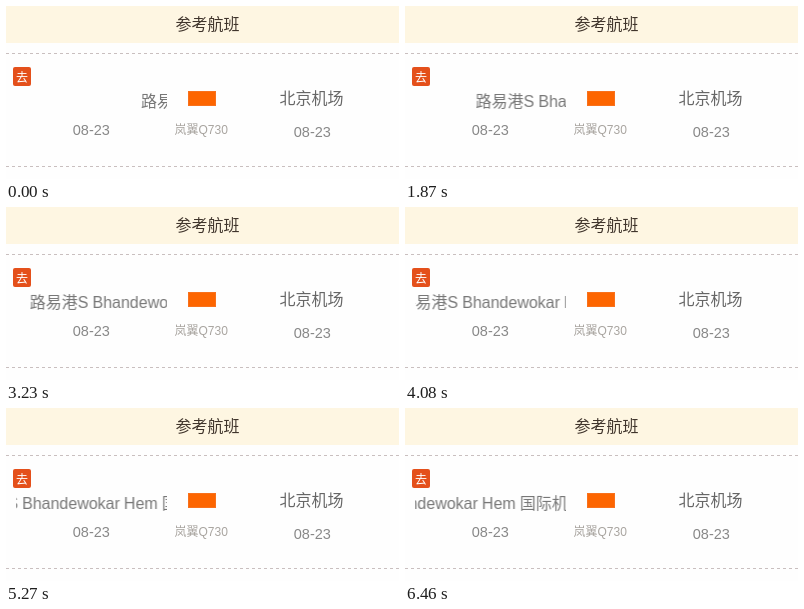
These frames come from a looping animation (393 by 173 pixels, 6630 ms). An HTML page:

```html
<!DOCTYPE html>
<html lang="zh-CN">
<head>
<meta charset="utf-8">
<title>参考航班</title>
<style>
  html, body { margin: 0; width: 100%; height: 100%; overflow: hidden; background: #fefefe; }
  svg { display: block; width: 393px; height: 173px; }
  text {
    font: 16px "Liberation Sans", "Noto Sans CJK SC", "Noto Sans CJK", sans-serif;
    fill: #777;
    white-space: pre;
  }
  .title { fill: #40352c; }
  .place { fill: #666; }
  .date { font-size: 14.5px; fill: #888; }
  .model { font-size: 12px; fill: #a9a5a0; }
  .tag { font-size: 12px; fill: #fff; }
  .rule { stroke: #c9bfbf; stroke-dasharray: 3 3; }
  .scroll { word-spacing: -.4px; animation: scroll 6630ms steps(39) infinite; }
  @keyframes scroll { to { transform: translateX(-228.5px); } }
</style>
</head>
<body>
<svg viewBox="0 0 393 173">
  <clipPath id="window"><rect x="10" y="82" width="151" height="28"/></clipPath>

  <rect width="393" height="37" fill="#fef6e2"/>
  <text class="title" x="169.5" y="24">参考航班</text>
  <path class="rule" d="M0 47.5H393M0 160.5H393"/>

  <rect x="7" y="61" width="18" height="19" rx="2" fill="#e4501b"/>
  <text class="tag" x="10" y="76">去</text>

  <g clip-path="url(#window)">
    <text class="scroll" x="135" y="101">路易港S Bhandewokar Hem 国际机场</text>
  </g>
  <text class="date" x="66.8" y="129">08-23</text>

  <rect x="182.5" y="85.5" width="27" height="14" fill="#fd6500" stroke="#f8711c"/>
  <text class="model" x="168.5" y="128">岚翼Q730</text>

  <text class="place" x="273.5" y="98">北京机场</text>
  <text class="date" x="287.8" y="131">08-23</text>
</svg>
</body>
</html>
```
